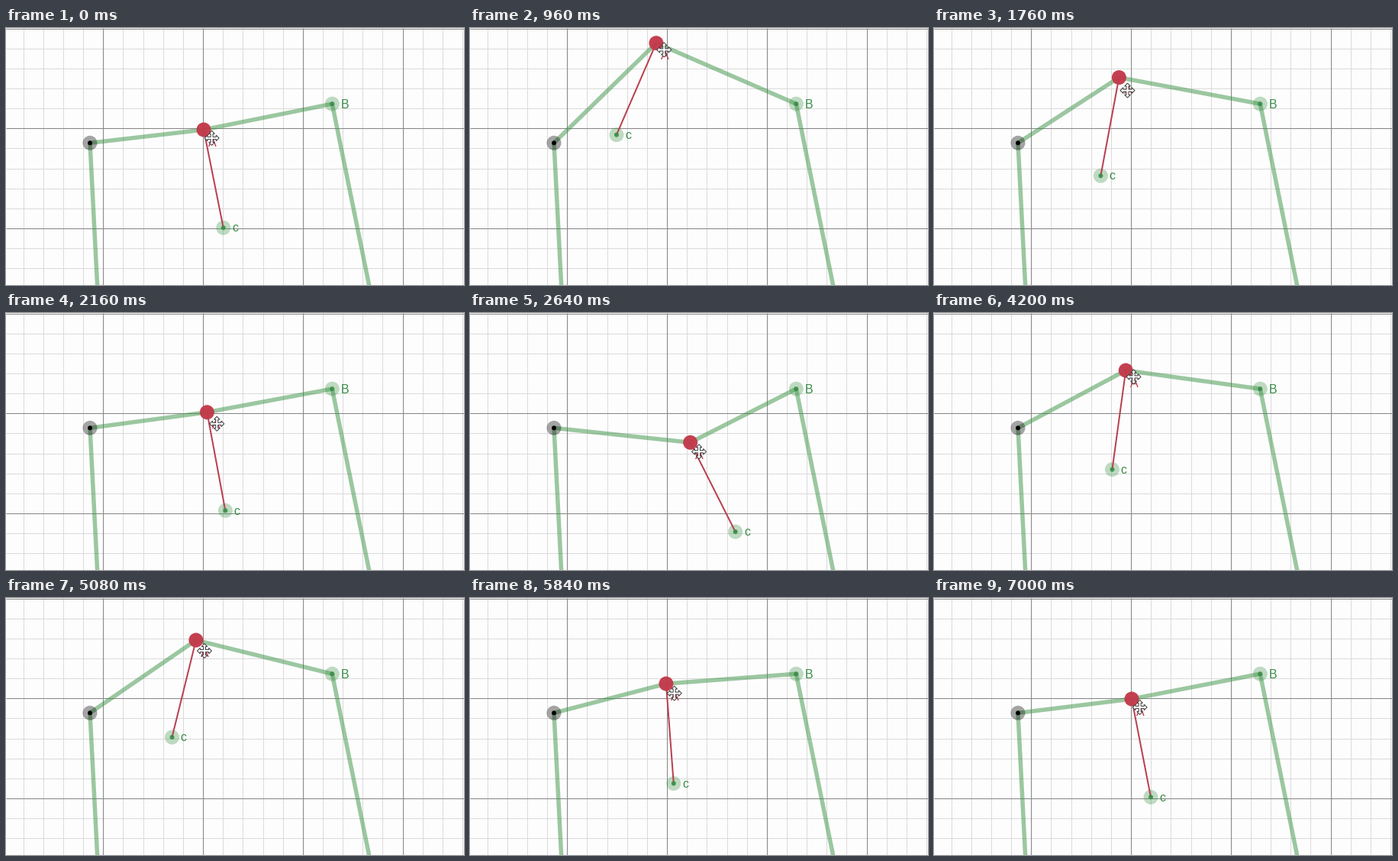
Recreate the animation shown at these times as a matplotlib script. Size 600 by 336 pixels, loop 7080 ms.

```python
import numpy as np
import matplotlib.pyplot as plt
from matplotlib.animation import FuncAnimation
from matplotlib.patches import Circle, Polygon

W, H, DPI = 600, 336, 100
STEP, FRAMES = 40, 177
PX = 72 / DPI  # one pixel in points
GREEN, LINK, RED = "#388c46", "#3a9245", "#c23a4a"
UNIT = 130.75  # major grid spacing, also the length of the normal

PIVOT = np.array([110, 150.3])
B = np.array([427.3, 99.2])
START = np.array([259, 133])

# Strokes of the dragged point: start ms, end ms, goal, skew (< 1 starts faster), bend in x
STROKES = [
    (160, 1040, (243.6, 17), 1, 0),
    (1500, 2800, (290.5, 172), 0.62, -19),
    (2880, 3840, (253, 88), 1, 0),
    (3920, 4700, (247, 44), 1, 0),
    (4960, 6640, (259, 132), 0.57, 1),
]


def drag(t):
    pos = START
    for t0, t1, goal, skew, bend in STROKES:
        s = np.clip((t - t0) / (t1 - t0), 0, 1) ** skew
        e = s * s * (3 - 2 * s)
        pos = pos + e * (goal - pos) + (bend * np.sin(np.pi * e), 0)
        if t < t1:
            break
    return pos


fig = plt.figure(figsize=(W / DPI, H / DPI), dpi=DPI, facecolor="#fdfdfd")
ax = fig.add_axes([0, 0, 1, 1])
ax.set(xlim=(0, W), ylim=(H, 0))
ax.axis("off")


def line(*points, color, width, z, **kw):
    xs, ys = zip(*points)
    return ax.plot(xs, ys, color=color, lw=width * PX, zorder=z,
                   solid_capstyle="butt", **kw)[0]


def disc(center, r, color, z, alpha=1):
    return ax.add_patch(Circle(center, r, fc=color, ec="none", alpha=alpha, zorder=z))


def label(text, pos, color, z):
    return ax.text(*pos, text, color=color, zorder=z, fontsize=16 * PX,
                   family="Liberation Sans", ha="left", va="baseline")


def grid(spacing, color, z):
    for x in np.arange(127.3 - UNIT, W, spacing):
        line((x, 0), (x, H), color=color, width=1, z=z)
    for y in np.arange(0.6, H, spacing):
        line((0, y), (W, y), color=color, width=1, z=z)


grid(UNIT / 5, "#dadada", 0)
grid(UNIT, "#858585", 1)

# Fixed linkage
link = dict(color=LINK, width=5.5, z=2, alpha=0.5)
line(PIVOT, (119.8, 340), **link)
line(B, (476.4, 340), **link)
disc(PIVOT, 9.5, "black", 3, 0.35)
disc(PIVOT, 3, "black", 4)
disc(B, 9.5, LINK, 3, 0.32)
disc(B, 3, GREEN, 4, 0.9)
label("B", B + (11.5, 5.7), GREEN, 4)

# Moving parts
arms = line(PIVOT, (0, 0), B, solid_joinstyle="round", **link)
normal = line((0, 0), (0, 0), color="#b8404f", width=2, z=5)
c_halo = disc((0, 0), 9.5, LINK, 3, 0.32)
c_dot = disc((0, 0), 3, GREEN, 6, 0.9)
c_text = label("c", (0, 0), GREEN, 6)
a_dot = disc((0, 0), 9.5, RED, 7, 0.97)
a_text = label("A", (0, 0), RED, 8)

# Four-way pointer: one arrow turned by quarter circles
ARM = np.array([(0, -9.5), (3.8, -5.6), (1.5, -5.6), (1.5, -1.5), (5.6, -1.5), (5.6, -3.8)])
TURN = np.array([[0, 1], [-1, 0]])
CROSS = np.vstack([ARM @ np.linalg.matrix_power(TURN, k) for k in range(4)])
cursor = ax.add_patch(Polygon(CROSS, fc="white", ec="#3c3c3c", lw=PX,
                              joinstyle="miter", zorder=9))


def update(n):
    t = n * STEP
    a = drag(t)
    dx, dy = B - a
    c = a + UNIT * np.array([-dy, dx]) / np.hypot(dx, dy)

    arms.set_data(*zip(PIVOT, a, B))
    normal.set_data(*zip(a, c))
    a_dot.center = a
    a_text.set_position(a + (6.2, 21.7))
    c_halo.center = c_dot.center = c
    c_text.set_position(c + (11.3, 5.3))

    # The pointer runs slightly ahead of the dragged point
    lead = 0.8 * (drag(t + STEP / 2) - drag(t - STEP / 2))
    cursor.set_xy(CROSS + a + (10.6, 10.9) + lead)
    return arms, normal, a_dot, a_text, c_halo, c_dot, c_text, cursor


anim = FuncAnimation(fig, update, frames=FRAMES, interval=STEP,
                     init_func=lambda: update(0), repeat=True, repeat_delay=0)
plt.show()
```
